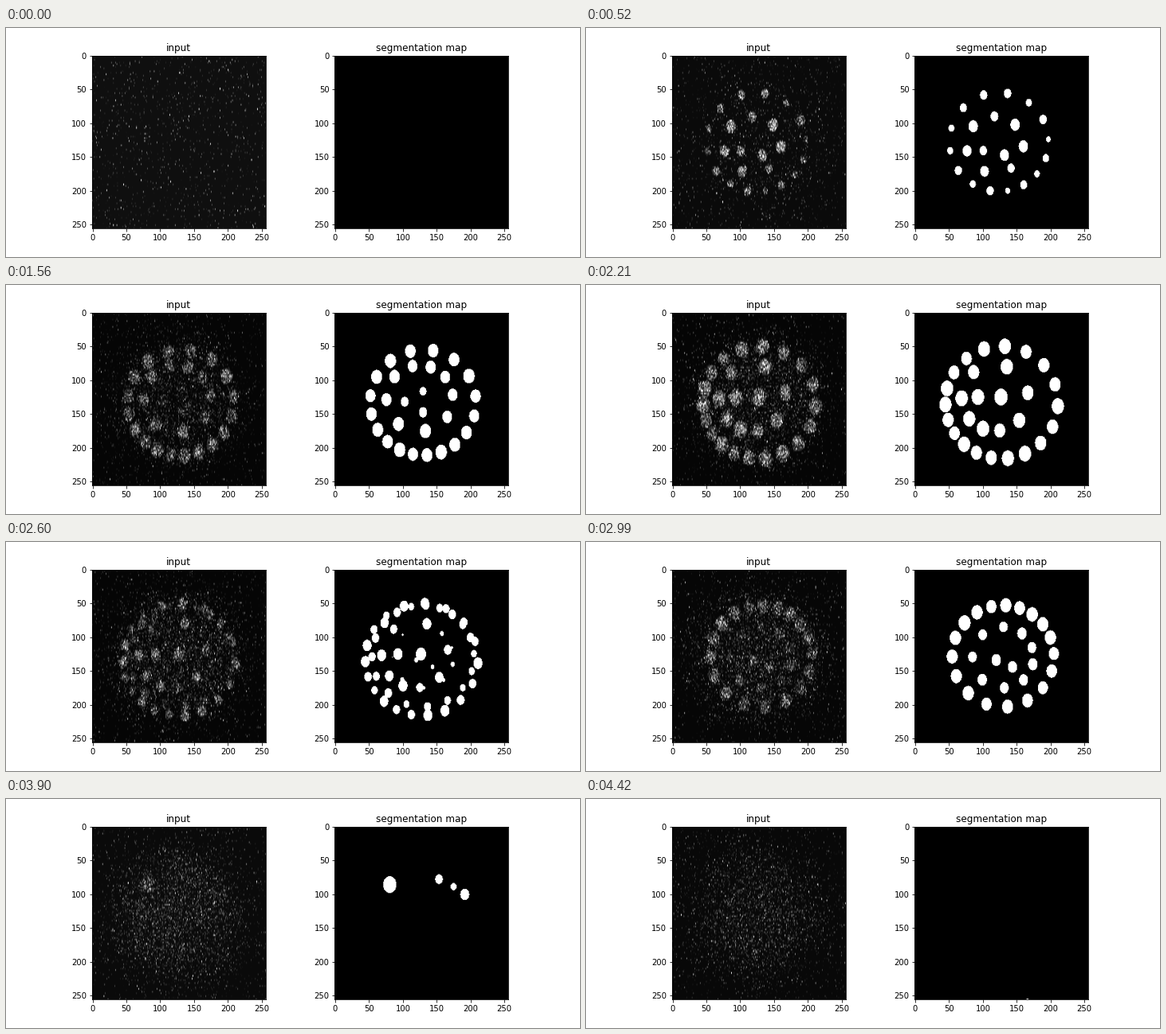
Write a matplotlib script that moves like this. It is 720x288 px and loops after 4.55 s.

```python
import numpy as np
import matplotlib.pyplot as plt
from matplotlib.animation import FuncAnimation

SIZE = 256
ROWS = 120         # coarse rows give the noise its vertical streaks
FRAMES = 35
INTERVAL = 130

yy, xx = np.mgrid[:SIZE, :SIZE].astype(float)
size_rng = np.random.default_rng(4)


def ring(n, x, y, radius, size, start=0, warp=0, peak=0):
    """Cells (x, y, size) clockwise from the top, their even spacing bent by a sine."""
    even = np.arange(n) * 360 / n
    angle = np.radians(even + start + warp * np.cos(np.radians(even - peak)))
    sizes = size * size_rng.uniform(0.92, 1.1, n)
    return list(zip(x + radius * np.sin(angle), y - radius * np.cos(angle), sizes))


upper = (ring(15, 124, 128, 73, 7.6, 5, 10, 60)
         + ring(7, 118, 132, 42, 8.6, -4, 6, 300)
         + ring(2, 116.5, 144, 16, 8.8, 102))
middle = (ring(18, 130, 133, 78, 7.8, -9, 14, 110)
          + ring(9, 125, 127, 49, 7.5, -23, 14, 320)
          + ring(3, 121, 132, 18, 5.5, 30))
equator = (ring(19, 128, 133, 83, 8.4, 11, 12, 130)
           + ring(8, 118, 126, 49, 8.8, 21, 22, 90)
           + ring(2, 110, 125, 17, 9.4, 90))
lower = (ring(18, 130, 128, 75, 8.1, -1, 12, 290)
         + ring(9, 130, 130, 45, 6.6, -11, 12)
         + ring(2, 132, 139, 13, 7, 113))
bottom = [(81, 86, 9.8), (153.5, 78, 5.6), (175, 89, 4.3), (191.5, 100.5, 6.6)]
edge = [(166, 258, 3)]

# depth, cells, brightness
LAYERS = [(0, [], 0), (8, upper, 4.8), (12, middle, 2.8), (17, equator, 3),
          (23, lower, 2.1), (30, bottom, 0.9), (34, edge, 0)]
DEPTHS = [layer[0] for layer in LAYERS]


def slices(z):
    """Yield (x, y, size, glow) of every cell cut at depth z."""
    for i, (depth, cells, bright) in enumerate(LAYERS):
        j = i + 1 if z > depth else i - 1
        gap = abs(DEPTHS[j] - depth) if 0 <= j < len(DEPTHS) else 1
        for x, y, size in cells:
            u = (z - depth) / (gap * min(0.08 * size, 1))
            if abs(u) < 1:
                s = np.sqrt(1 - u * u)
                yield x, y, size * s, bright * s * min(1, size / 8.8) ** 3


def speckle(light, seed):
    """Photon noise on coarse rows, blended down to the full height."""
    rng = np.random.default_rng(seed)
    rows = np.linspace(0, SIZE - 1, ROWS).astype(int)
    grain = rng.gamma(rng.poisson(light[rows]))
    pos = np.linspace(0, ROWS - 1, SIZE)
    low = np.minimum(pos.astype(int), ROWS - 2)
    part = (pos - low)[:, None]
    return grain[low] * (1 - part) + grain[low + 1] * part


def render(z):
    mask = np.zeros((SIZE, SIZE))
    light = np.zeros((SIZE, SIZE))
    for x, y, size, glow in slices(z):
        d2 = ((xx - x) / size) ** 2 + ((yy - y) / (1.28 * size)) ** 2
        mask[d2 <= 1] = 255
        light = np.maximum(light, glow * np.sqrt(np.clip(1 - d2 / 1.3, 0, 1)))

    haze = np.interp(z, [0, 8, 12, 30, 34], [0, 0.13, 0.32, 0.42, 0.32])
    dist = np.hypot(xx - 126, yy - 128) / 92
    light += 0.045 + haze * np.exp(-dist ** 4)

    base = np.interp(z, [0, 8, 23, 30, 34], [15, 5, 6, 10, 8])
    gain = np.interp(z, [0, 8, 23, 34], [60, 35, 42, 42])
    return np.clip(base + gain * speckle(light, z), 0, 255), mask


plt.rcParams.update({"font.family": "DejaVu Sans", "font.size": 10,
                     "figure.subplot.bottom": 0.125})
fig, axes = plt.subplots(1, 2, figsize=(10, 4), dpi=72)
images = []
for ax, title, data in zip(axes, ("input", "segmentation map"), render(0)):
    images.append(ax.imshow(data, cmap="gray", vmin=0, vmax=255))
    ax.set_title(title)


def update(frame):
    for image, data in zip(images, render(frame)):
        image.set_data(data)
    return images


anim = FuncAnimation(fig, update, frames=FRAMES, interval=INTERVAL, repeat=True, repeat_delay=0)
plt.show()
```
